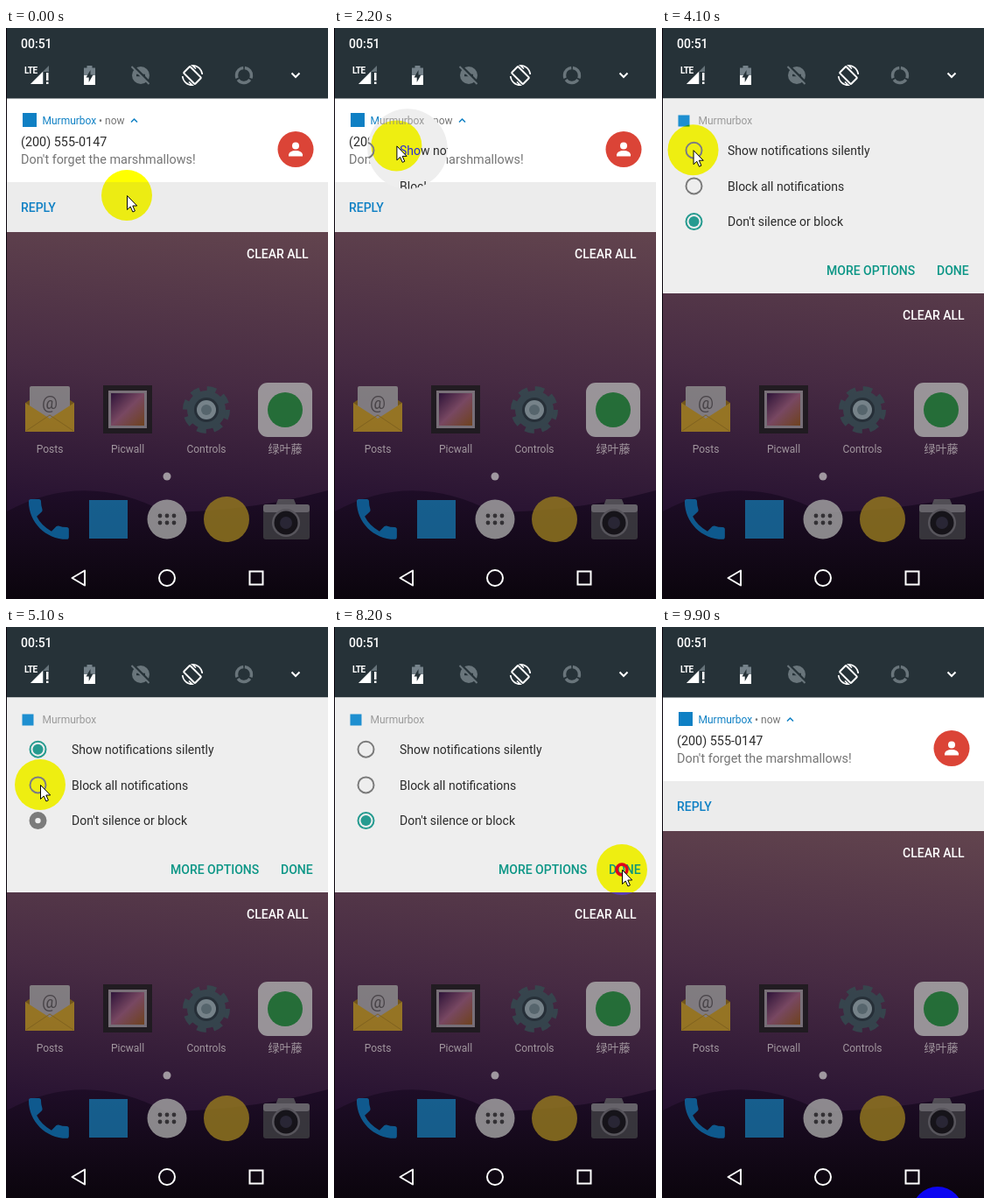
An HTML page for the animation above (9950 ms loop, 368 px wide and 652 px high).

```html
<!DOCTYPE html>
<html lang="en">
<head>
<meta charset="utf-8">
<title>Notification controls</title>
<style>
html, body { margin: 0; width: 100%; height: 100%; overflow: hidden; background: #000; }
svg { display: block; width: 368px; height: 652px; }
text { font: 14px Roboto, "Noto Sans", sans-serif; fill: #2b2b2b; white-space: pre; }
.bold { font-weight: 500; }
.white { fill: #fff; }
.teal { fill: #0c9686; }
.blue { fill: #0f80c4; }
.body { font-size: 14.4px; }
.head { font-size: 12px; }
.label text { font-size: 12px; text-anchor: middle; fill: #a1969e; }
.label .cjk { font: 13px "Noto Sans CJK SC", "Noto Sans CJK", sans-serif; }
.line { fill: none; stroke: #fff; stroke-width: 2; }
.dim { opacity: .82; }
#halo { fill: #00f; mix-blend-mode: difference; }
</style>
</head>
<body>
<svg viewBox="0 0 368 652">
  <defs>
    <linearGradient id="sky" x1=".1" y1="0" x2="0" y2="1">
      <stop offset="0" stop-color="#62444e"/>
      <stop offset=".5" stop-color="#472b43"/>
      <stop offset="1" stop-color="#220e2e"/>
    </linearGradient>
    <linearGradient id="hills" x1="0" y1="0" x2="0" y2="1">
      <stop offset="0" stop-color="#1e0d27"/>
      <stop offset="1" stop-color="#0b050d"/>
    </linearGradient>
    <linearGradient id="art" x1="0" y1="0" x2="1" y2="1">
      <stop offset="0" stop-color="#2a1038"/>
      <stop offset=".5" stop-color="#85506a"/>
      <stop offset="1" stop-color="#7a4a18"/>
    </linearGradient>
    <clipPath id="sheet"><rect id="sheetBox" x="1" y="80.5" width="367" height="0"/></clipPath>
    <clipPath id="reveal"><circle id="revealDisc" cx="84" cy="138" r="0"/></clipPath>
  </defs>

  <!-- wallpaper -->
  <rect width="368" height="652" fill="#0b050d"/>
  <rect x="1" y="200" width="367" height="370" fill="url(#sky)"/>
  <path d="M1 552Q90 504 182 553Q280 552 368 528V652H1z" fill="url(#hills)"/>

  <!-- home icons -->
  <g class="dim">
    <path d="M22 428L50 410L78 428V458H22z" fill="#7d6116"/>
    <rect x="27" y="409" width="46" height="40" rx="2" fill="#8f8f8f"/>
    <text x="50" y="435" text-anchor="middle" style="font-size:20px;fill:#4b4b4b">@</text>
    <path d="M22 428L50 446L78 428V461H22z" fill="#a9861f"/>
    <path d="M23 460L50 442L77 460" fill="none" stroke="#8f7019"/>

    <rect x="111" y="408" width="56" height="55" fill="#1b1a1c"/>
    <rect x="117" y="414" width="44" height="43" fill="#858085"/>
    <rect x="120" y="417" width="38" height="37" fill="url(#art)"/>

    <circle cx="229" cy="436" r="23" fill="none" stroke="#344b50" stroke-width="8" stroke-dasharray="10 8.06"/>
    <circle cx="229" cy="436" r="22" fill="#344b50"/>
    <circle cx="229" cy="436" r="14" fill="#213237"/>
    <circle cx="229" cy="436" r="11" fill="#82979a"/>
    <circle cx="229" cy="436" r="6" fill="#5b7377"/>

    <rect x="288" y="405" width="62" height="62" rx="11" fill="#acacac"/>
    <circle cx="319" cy="436" r="20" fill="#1f7d37"/>
  </g>
  <g class="label">
    <text x="50" y="485">Posts</text>
    <text x="139" y="485">Picwall</text>
    <text x="229" y="485">Controls</text>
    <text x="319" y="485" class="cjk">绿叶藤</text>
  </g>
  <circle cx="184" cy="512" r="4.5" fill="#a098a0"/>

  <!-- dock -->
  <g class="dim">
    <path transform="translate(18.3 530.3) scale(2.55)" fill="#0d6ba6" d="M6.600 10.800Q8.700 15 13.200 17.400L15.400 15.200Q16 14.800 16.400 15Q18 15.600 20 15.600Q21 15.600 21 16.600V20Q21 21 20 21C10.600 21 3 13.400 3 4Q3 3 4 3H7.500Q8.500 3 8.500 4Q8.500 6 9.100 7.600Q9.200 8.200 8.900 8.600z"/>
    <rect x="95" y="539" width="44" height="44" fill="#1670a4"/>
    <circle cx="184" cy="561" r="22.5" fill="#a3a3a3"/>
    <g id="dots" fill="#3a3a3a"></g>
    <circle cx="252" cy="561" r="26" fill="#94781f"/>
    <path d="M307 548L311 538H329L333 548z" fill="#5c5c5f"/>
    <rect x="294" y="544" width="53" height="40" rx="3" fill="#3f3f43"/>
    <rect x="294" y="544" width="53" height="9" rx="3" fill="#77777a"/>
    <circle cx="320" cy="565" r="16" fill="#66666a"/>
    <circle cx="320" cy="565" r="13.5" fill="#161619"/>
    <circle cx="320" cy="565" r="7" fill="#2d2d3a"/>
  </g>

  <!-- navigation -->
  <path class="line" d="M75.500 628L90 619.500V636.500z" stroke-linejoin="round"/>
  <circle class="line" cx="184" cy="628" r="9"/>
  <rect class="line" x="278.5" y="620.5" width="15" height="15"/>

  <!-- status bar -->
  <rect x="1" width="367" height="81" fill="#263238"/>
  <text x="17" y="23" class="bold white">00:51</text>
  <text x="21" y="52" class="white" style="font-size:10px;font-weight:700;letter-spacing:-.6px">LTE</text>
  <path d="M49 43V64H28z" fill="#66737a"/>
  <path d="M42 50V64H28z" fill="#fff"/>
  <path d="M43 50H52V65H43z" fill="#263238"/>
  <path d="M46 51H48.500V60H46zM46 61.500H48.500V64H46z" fill="#fff"/>
  <path d="M92.500 43H98.500V45.500H102V54H89V45.500H92.500z" fill="#75828a"/>
  <path d="M89 54H102V65H89z" fill="#fff"/>
  <path d="M96.500 48L91.500 56.500H94.700V62L99.500 53.500H96.500z" fill="#263238"/>
  <circle cx="154" cy="54" r="10" fill="#69757b"/>
  <path d="M149 54H159" stroke="#263238" stroke-width="2.5"/>
  <path d="M145 43L165 63" stroke="#263238" stroke-width="3"/>
  <path d="M143.500 44L163.500 64" stroke="#69757b" stroke-width="2"/>
  <g class="line" transform="translate(213 54)">
    <rect x="-5.2" y="-9.2" width="10.4" height="18.4" rx="1" transform="rotate(-45)"/>
    <path id="arc" d="M4 -7.500L0 -11.300A11.300 11.300 0 0 1 11.300 -1" stroke-width="1.6"/>
    <use href="#arc" transform="rotate(180)"/>
  </g>
  <circle cx="272" cy="54" r="8.5" fill="none" stroke="#69757b" stroke-width="3.5" stroke-dasharray="15.8 2" transform="rotate(-84 272 54)"/>
  <path class="line" d="M326.500 51.500L331 56L335.500 51.500"/>

  <!-- notification sheet -->
  <g clip-path="url(#sheet)">
    <rect y="80" width="368" height="230" fill="#fff"/>
    <rect y="176" width="368" height="57" fill="#ececec"/>
    <rect x="19" y="97" width="16" height="16" class="blue"/>
    <text x="41.5" y="110" class="head blue">Murmurbox</text>
    <text x="106" y="110" class="head" style="fill:#757575">• now</text>
    <path d="M143 107.500L146.500 104L150 107.500" fill="none" stroke="#0f80c4" stroke-width="1.5"/>
    <text x="17" y="135" class="body">(200) 555-0147</text>
    <text x="17" y="155" class="body" style="fill:#757575">Don't forget the marshmallows!</text>
    <circle cx="331" cy="138.5" r="20.5" fill="#db4437"/>
    <circle cx="331" cy="134.5" r="4" fill="#fff"/>
    <path d="M323 146.500V144.500Q324 140 331 140T339 144.500V146.500z" fill="#fff"/>
    <text x="17" y="209.5" class="bold blue">REPLY</text>
    <circle id="ripple" cx="84" cy="138" r="0"/>

    <g clip-path="url(#reveal)">
      <rect y="80" width="368" height="230" fill="#eee"/>
      <rect x="18.5" y="99.5" width="13" height="13" fill="#1e8fd0"/>
      <text x="41.5" y="110" class="head" style="fill:#9a9a9a">Murmurbox</text>
      <g id="choices"></g>
      <text x="188" y="282" class="bold teal">MORE OPTIONS</text>
      <text x="314" y="282" class="bold teal">DONE</text>
    </g>
  </g>
  <text id="clear" x="275" class="bold white">CLEAR ALL</text>

  <!-- pointer -->
  <circle id="halo" r="29"/>
  <g id="pointer">
    <circle id="press" r="6" fill="none" stroke="#e2001a" stroke-width="3.5"/>
    <path d="M.5 .5V16.500L4.200 13L6.900 19L9.400 17.900L6.800 12H11.700z" fill="#fff" stroke="#000"/>
  </g>
</svg>

<script>
const LOOP = 9950, STEP = 100, PRESS = 200, TOGGLE = 1000;
const $ = id => document.getElementById(id);

function set(el, attrs) {
  for (const k in attrs) el.setAttribute(k, attrs[k]);
  return el;
}
function add(parent, tag, attrs) {
  const el = document.createElementNS("http://www.w3.org/2000/svg", tag);
  return parent.appendChild(set(el, attrs));
}
// Progress 0 to 1 of t between a and b
const ramp = (a, b, t) => Math.min(1, Math.max(0, (t - a) / (b - a)));

// Pointer rests: time of arrival, time of leaving, place
const rests = [
  [0, 0, 138, 191], [700, 700, 46, 128], [1000, 2000, 84.5, 137.5],
  [2800, 3300, 32, 125], [4200, 4500, 36, 141], [5000, 5700, 39, 180],
  [6000, 6400, 36, 222], [6800, 6800, 167, 271], [7000, 7000, 263, 291],
  [7300, 7600, 220, 290], [8000, 8500, 329, 277], [9900, LOOP, 315, 668]
];
const longPress = 1100, done = 8200;

// Moments at which an option becomes the chosen one
const picks = [
  { at: 2800, row: 2 }, { at: 4400, row: 0 }, { at: 5500, row: 1 }, { at: 6300, row: 2 }
];
const clicks = [...picks.slice(1).map(p => p.at), done];

const radios = ["Show notifications silently", "Block all notifications", "Don't silence or block"]
  .map((label, row) => {
    const y = 139.7 + row * 40.7, box = $("choices");
    add(box, "text", { x: 75, y: y + 5.2 }).textContent = label;
    return {
      ring: add(box, "circle", { cx: 36.5, cy: y, fill: "none" }),
      dot: add(box, "circle", { cx: 36.5, cy: y })
    };
  });

for (let i = 0; i < 6; i++)
  add($("dots"), "circle", { cx: 176 + i % 3 * 8, cy: 557 + Math.floor(i / 3) * 8, r: 2.4 });

function pointerAt(t) {
  const i = Math.max(1, rests.findIndex(r => t <= r[1]));
  const [, leave, x, y] = rests[i - 1], [arrive, , x2, y2] = rests[i];
  const k = ramp(leave, arrive, t);
  return [x + (x2 - x) * k, y + (y2 - y) * k];
}

const isPressed = t => (t >= longPress && t < longPress + 4 * PRESS) ||
  clicks.some(c => t >= c && t < c + PRESS);

// The ring closes to a full disc halfway, then the disc shrinks to a dot
function drawRadio({ ring, dot }, p, chosen) {
  const hole = p < .5 ? 8 * (1 - 2 * p) : 8;
  const color = chosen ? "#269b90" : "#7b7b7b";
  set(ring, { r: (10 + hole) / 2, "stroke-width": 10 - hole, stroke: color });
  set(dot, { r: p < .5 ? 0 : Math.max(6, 20 * (1 - p)), fill: color });
}

function drawRadios(t) {
  const n = Math.max(0, picks.findLastIndex(p => p.at <= t));
  const k = ramp(picks[n].at, picks[n].at + TOGGLE, t);
  radios.forEach((radio, row) => {
    const chosen = row === picks[n].row;
    const was = n > 0 && row === picks[n - 1].row;
    drawRadio(radio, chosen ? k : was ? 1 - k : 0, chosen);
  });
}

function draw(t) {
  const [x, y] = pointerAt(t);
  set($("halo"), { cx: x, cy: y });
  set($("pointer"), { transform: `translate(${x} ${y})` });
  set($("press"), { visibility: isPressed(t) ? "visible" : "hidden" });

  const bottom = 233 + 70 * (ramp(3000, 3360, t) - ramp(8500, 9000, t));
  set($("sheetBox"), { height: bottom - 80.5 });
  set($("clear"), { y: bottom + 30 });
  set($("revealDisc"), { r: 400 * (ramp(2000, 3750, t) - ramp(8400, 9100, t)) });

  const touch = ramp(1300, 2000, t);
  set($("ripple"), { r: 400 * touch, opacity: .06 * Math.sin(Math.PI * touch) });
  drawRadios(t);
}

const start = performance.now();
function tick() {
  const t = (performance.now() - start) % LOOP;
  draw(Math.floor(t / STEP) * STEP);
  requestAnimationFrame(tick);
}
tick();
</script>
</body>
</html>
```
